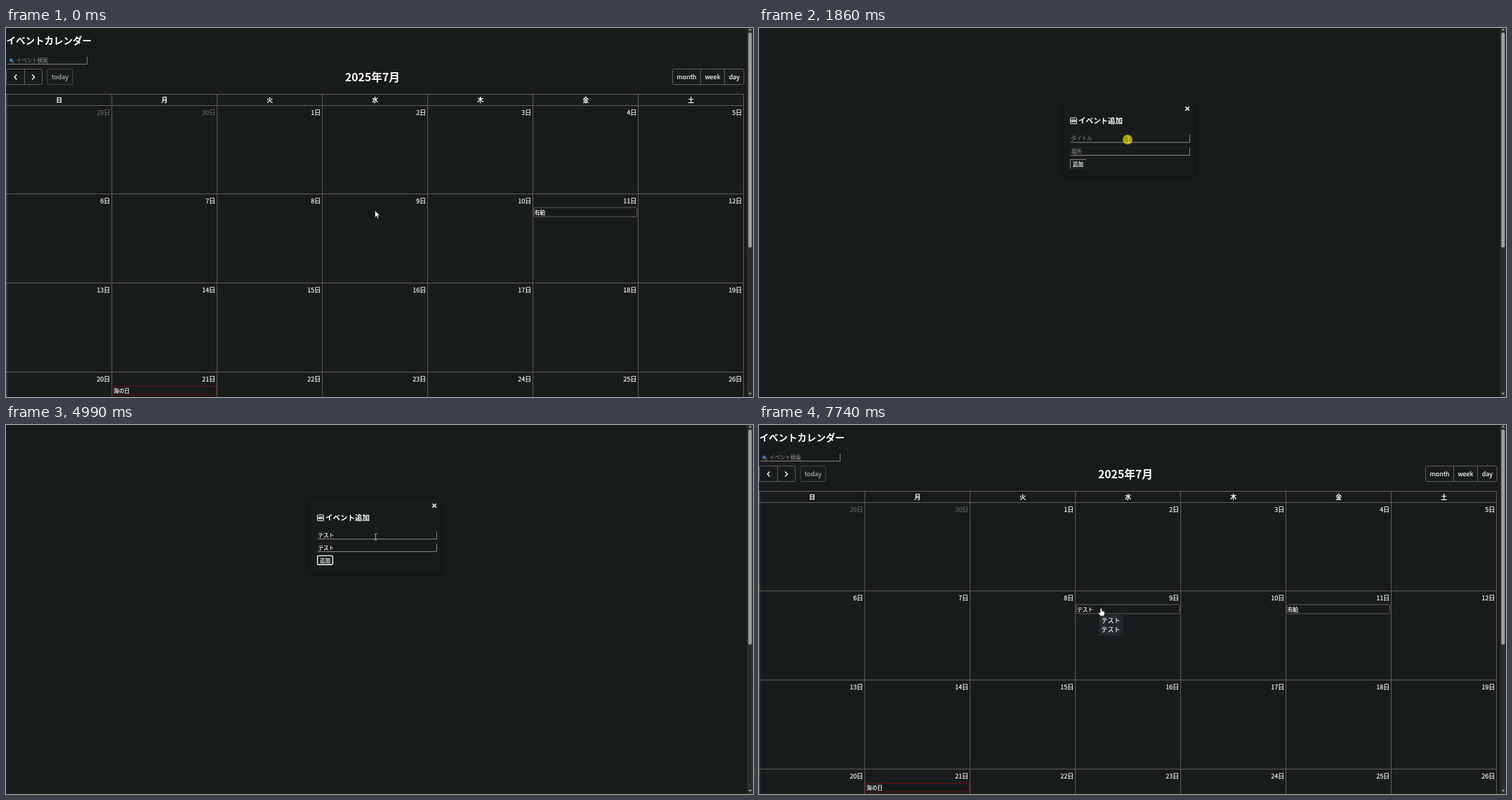
An HTML page that plays this animation: 1064 px wide and 526 px high, repeating every 8000 ms.

```html
<!DOCTYPE html>
<html lang="ja">
<head>
<meta charset="utf-8">
<title>イベントカレンダー</title>
<style>
  html, body { margin: 0; width: 100%; height: 100%; overflow: hidden; background: #181b1c; }
  svg { display: block; width: 1064px; height: 526px; }
  text { font: 9px "Noto Sans CJK JP", "Noto Sans CJK", "Noto Sans", sans-serif; fill: #fff; stroke: #fff; stroke-width: .18px; white-space: pre; }
  .bold { font-weight: 700; stroke: none; }
  .line { fill: none; stroke: #655f52; }
  .edge { fill: none; stroke: #8b857a; }
  .ring { fill: none; stroke: #fff; stroke-width: 1.3; }
</style>
</head>
<body>
<svg id="stage" viewBox="0 0 1064 526"></svg>
<script>
const LOOP = 8000;
const stage = document.getElementById('stage');

const text = (x, y, s, size = 9, attrs = '') =>
  `<text x="${x}" y="${y}" style="font-size:${size}px" ${attrs}>${s}</text>`;
const mid = 'text-anchor="middle"';
const box = (x, y, w, h, r = 0, attrs = 'class="line"') =>
  `<rect x="${x}" y="${y}" width="${w}" height="${h}" rx="${r}" ${attrs}/>`;
const path = (d, attrs = 'class="line"') => `<path d="${d}" ${attrs}/>`;
const group = (id, body) => `<g id="${id}">${body}</g>`;

function calendar() {
  const rows = [110.5, 236.5, 363.5, 490.5];
  let out = text(0.5, 23, 'イベントカレンダー', 13.5, 'class="bold"')
    + path('M2 51.5H115.5V41', 'class="edge"')
    + path('M9.5 47.5l2 2', 'stroke="#8a6a4a" stroke-width="1.4"')
    + '<circle cx="7.5" cy="46" r="2.6" fill="#3f6fa8"/>'
    + text(14.7, 49, 'イベント検索', 7.5, 'opacity=".42"')
    + box(0.5, 58.5, 51, 22, 2) + path('M26.5 58.5v22')
    + path('M15.3 66.6L12 70l3.3 3.4M37.2 66.6l3.3 3.4-3.3 3.4', 'fill="none" stroke="#fff" stroke-width="1.4"')
    + `<g opacity=".65">${box(59, 58.5, 36, 22, 2)}${text(77, 73.3, 'today', 9, mid)}</g>`
    + text(522, 76, '2025年7月', 15.75, 'class="bold" ' + mid)
    + box(949.5, 58.5, 101.5, 22, 2) + path('M989.5 58.5v22M1023.5 58.5v22')
    + text(969.5, 73.3, 'month', 9, mid) + text(1006.5, 73.3, 'week', 9, mid) + text(1037.3, 73.3, 'day', 9, mid)
    + path('M0 94.5H1051');
  for (let i = 0; i < 8; i++) out += path(`M${0.8 + 149.95 * i} 94.5V526`);
  [...'日月火水木金土'].forEach((d, i) => out += text(75.7 + 150 * i, 106.3, d, 9, 'class="bold" ' + mid));
  rows.forEach((y, r) => {
    out += path(`M0 ${y}H1051`);
    for (let c = 0; c < 7; c++) {
      const n = r * 7 + c - 1;
      out += text(148.3 + 150 * c, y + 13, (n < 1 ? n + 30 : n) + '日', 9,
        'text-anchor="end"' + (n < 1 ? ' opacity=".32"' : ''));
    }
  });
  return out
    + box(752, 256, 146.5, 13, 1.5) + text(752.9, 265.8, '有給', 7.65)
    + box(152, 510.5, 147.5, 12.5, 1.5, 'fill="none" stroke="#6e0d10"') + text(153.3, 519.8, '海の日', 7.65)
    + group('added', box(452, 256, 147, 13, 1.5) + text(453, 265.8, 'テスト', 7.65));
}

function field(id, hint, y) {
  return group(id, path(`M443.5 ${y + 11}H613.5V${y}`, 'class="edge"')
    + path(`M443.5 ${y + 11}V${y}H613.5`, 'fill="none" stroke="#26292a" stroke-width=".6"')
    + box(443.6, y - 0.2, 169.8, 10.6, 1.6, 'class="ring"')
    + text(444.7, y + 8, hint, 7.5) + path(`M0 ${y + 1}v9`, 'class="caret" stroke="#fff" stroke-width=".9"'));
}

function dialog() {
  return box(433, 104, 187, 107, 3, 'fill="#181b1c" style="filter:drop-shadow(0 1px 3px #0006)"')
    + path('M607.4 112.2l5.4 5.4m0-5.4l-5.4 5.4', 'stroke="#f5f3ee" stroke-width="1.5"')
    + box(443.5, 128, 9, 8.5, 0.5, 'fill="none" stroke="#e8e6cf"')
    + box(444.8, 129.8, 6.4, 4.9, 0, 'fill="#e8e6cf" opacity=".45"')
    + text(448, 133.7, 'NEW', 3.4, 'class="bold" ' + mid)
    + text(455, 136.2, 'イベント追加', 10.53, 'class="bold"')
    + field('title', 'タイトル', 152) + field('place', '場所', 170.5)
    + group('button', path('M443.5 200.5V187.5H466', 'class="edge"')
      + path('M443.5 200.5H465.5V187.5', 'fill="none" stroke="#2c2e2f" stroke-width=".7"')
      + box(443.6, 187.4, 21.8, 12.6, 2, 'class="ring"')
      + text(454.5, 196.9, '追加', 7.5, mid));
}

const outline = 'fill="#fff" stroke="#000" stroke-width=".6" stroke-linejoin="round"';

stage.innerHTML = box(0, 0, 1064, 526, 0, 'fill="#181b1c"')
  + group('calendar', calendar()) + group('dialog', dialog())
  + box(1055.5, 0, 8.5, 526, 0, 'fill="#2c2c2c"') + box(1057.3, 6.5, 5, 306.5, 2.5, 'fill="#9f9f9f"')
  + path('M1057.5 3.5l2.5-3 2.5 3zM1057.5 520l2.5 3 2.5-3z', 'fill="#9f9f9f"')
  + group('tip', box(484, 271, 35, 29, 2, 'fill="#25282a"')
    + text(487.5, 282.2, 'テスト') + text(487.5, 295.4, 'テスト'))
  + '<circle id="click" cx="525" r="7" fill="#fff000" opacity=".62"/>'
  + group('arrow', path('M0 0V10.2L2.3 8.1 3.9 11.7 5.5 11 3.9 7.5H7z', outline))
  + group('beam', path('M-2 -4.5Q0 -4.5 0 -3.5Q0 -4.5 2 -4.5M0 -3.5V3.5M-2 4.5Q0 4.5 0 3.5Q0 4.5 2 4.5',
      'fill="none" stroke="#d0d0d0" stroke-width=".8"'))
  + group('hand', path('M-1.2 .7Q0 -.7 1.2 .7V3.8L4.2 4.7Q5.4 5.1 5.2 6.6L4.4 11.2H-.8L-3.8 7.3Q-3.7 5.8 -2.4 6.2L-1.2 7z', outline));

const el = id => document.getElementById(id);
const show = (id, on) => el(id).style.display = on ? '' : 'none';
const shift = (id, x, y) => el(id).setAttribute('transform', `translate(${x} ${y})`);
const within = (t, a, b) => t >= a && t < b;
const ease = p => p * p * (3 - 2 * p);
// Pointer travel in even held steps, the first one taken at `start`
const travel = (t, start, gap, count) =>
  ease(Math.max(0, Math.min(count, Math.floor((t - start) / gap) + 1)) / count);

const typing = [[2850, 'ｔ'], [2920, 'て'], [3120, 'てｓ'], [3320, 'てす'], [3420, 'てすｔ'], [3520, 'てすと'], [3720, 'テスト']];
const typed = t => typing.reduce((s, [at, v]) => t >= at ? v : s, '');

function setField(id, hint, value, focus, caret) {
  const g = el(id), label = g.querySelector('text'), bar = g.querySelector('.caret');
  label.textContent = value || hint;
  label.style.opacity = value ? 1 : 0.42;
  g.querySelector('.ring').style.display = focus ? '' : 'none';
  g.querySelector('.edge').style.display = focus ? 'none' : '';
  bar.style.display = caret ? '' : 'none';
  bar.setAttribute('transform', `translate(${445.5 + 7.1 * value.length} 0)`);
}

function draw(t) {
  const open = within(t, 860, 5390);
  show('calendar', !open);
  show('dialog', open);
  show('added', t >= 5390);

  setField('title', 'タイトル', typed(t), within(t, 1930, 4120), within(t, 1930, 2390) || within(t, 2850, 4120));
  setField('place', '場所', t >= 4120 ? 'テスト' : '', within(t, 4120, 4990), within(t, 4120, 4650));
  const lift = t >= 4120 ? -1 : t >= 2850 ? -0.5 : 0;
  shift('title', 0, t >= 2850 ? -0.4 : 0);
  shift('place', 0, lift);
  shift('button', 0, lift);
  el('button').querySelector('.ring').style.display = t >= 4990 ? '' : 'none';

  const up = travel(t, 1520, 68, 4), down = travel(t, 7260, 68.5, 7);
  const x = 525.5 - 38.3 * down, y = 260 - 101 * up + 102 * down;
  const beam = open && y < 164, hand = t > 7260 && y > 256;
  show('arrow', !beam && !hand);
  show('beam', beam);
  show('hand', hand);
  shift('arrow', x, y);
  shift('beam', x + 1, y + 0.5);
  shift('hand', x, y);
  show('click', within(t, 720, 920) || within(t, 1860, 1990));
  el('click').setAttribute('cy', y);
  show('tip', t >= 7738);
}

function tick() {
  draw(performance.now() % LOOP);
  requestAnimationFrame(tick);
}
tick();
</script>
</body>
</html>
```
